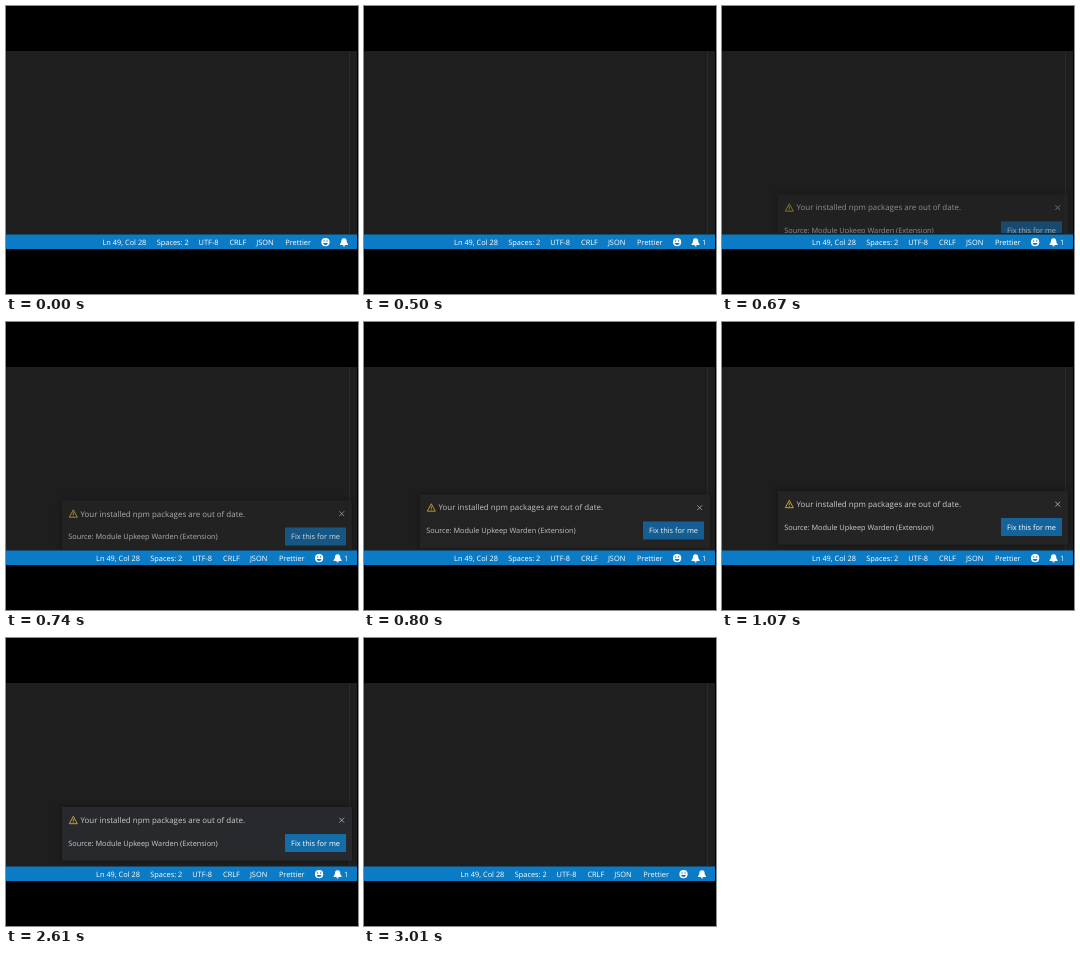
An HTML page for the animation above (8000 ms loop, 352 by 288 pixels).

```html
<!DOCTYPE html>
<html lang="en">
<head>
<meta charset="utf-8">
<title>Editor notification</title>
<style>
  html, body { margin: 0; width: 100%; height: 100%; overflow: hidden; background: #000; }
  svg { display: block; width: 352px; height: 288px; }
  text {
    font: 7.4px "Open Sans", "Noto Sans", sans-serif;
    text-rendering: geometricPrecision;
    white-space: pre;
  }
  #status { fill: #fff; }
  #toast { fill: #ccc; }
  #panel { filter: drop-shadow(0 0 3px rgba(0, 0, 0, .4)); }
  .title { font-size: 7.95px; }
</style>
</head>
<body>
<svg viewBox="0 0 352 288">
  <clipPath id="editorArea"><rect y="45" width="351" height="182"/></clipPath>

  <rect y="45" width="351" height="184" fill="#1e1e1e"/>
  <path d="M343.5 45V228" stroke="#2a2a2a"/>

  <g clip-path="url(#editorArea)">
    <g id="toast">
      <rect id="panel" x="56" y="169" width="290" height="53.5"/>
      <g fill="none" stroke="#d2ae2c" stroke-width=".9" stroke-linejoin="round">
        <path d="M67.3 178.3L71.3 185.7H63.3Z"/>
        <path d="M67.3 180.8V183.4M67.3 184.1V184.9"/>
      </g>
      <text class="title" x="74.5" y="185">Your installed npm packages are out of date.</text>
      <path d="M333.3 179.8l4.8 4.8m0-4.8l-4.8 4.8" stroke="#bbb" stroke-width=".8"/>
      <text x="62.2" y="207.7" style="font-size:7.33px">Source: Module Upkeep Warden (Extension)</text>
      <rect id="button" x="279" y="196" width="61" height="18"/>
      <text x="309.5" y="207.7" text-anchor="middle" fill="#fff">Fix this for me</text>
    </g>
  </g>

  <rect y="228.5" width="351" height="14.5" fill="#0a7bc4"/>
  <g id="status">
    <text x="96.5" y="238.8">Ln 49, Col 28</text>
    <text x="150.7" y="238.8">Spaces: 2</text>
    <text x="192.6" y="238.8">UTF-8</text>
    <text x="223.4" y="238.8">CRLF</text>
    <text x="250.3" y="238.8">JSON</text>
    <text x="279.3" y="238.8">Prettier</text>
    <circle cx="319.5" cy="236.2" r="4.1"/>
    <g fill="#0a7bc4">
      <circle cx="318" cy="235" r=".7"/>
      <circle cx="321" cy="235" r=".7"/>
      <path d="M317 237.1h5q-.6 2-2.5 2t-2.5-2Z"/>
    </g>
    <path d="M338 232.2c2.2 0 2.6 1.6 2.7 3.2q.1 1.6 1.3 2.7v.8h-8v-.8q1.2-1.1 1.3-2.7c.1-1.6.5-3.2 2.7-3.2ZM336.8 239.3h2.4q-.2 1.2-1.2 1.2t-1.2-1.2Z"/>
    <text id="badge" x="344.4" y="238.8">1</text>
  </g>
</svg>

<script>
const LOOP = 8000;
const SLIDE_START = 503, SLIDE_TIME = 372, SLIDE_HEIGHT = 54;
const byId = id => document.getElementById(id);
const [toast, panel, button, status, badge] =
  ["toast", "panel", "button", "status", "badge"].map(byId);

const show = (node, on) => node.setAttribute("visibility", on ? "visible" : "hidden");
const easeOut = x => 1 - (1 - Math.min(1, Math.max(0, x))) ** 1.7;

function render(t) {
  const notified = t >= 500 && t < 2975;
  status.setAttribute("transform", `translate(${notified ? -6.4 : 0} 0)`);
  show(badge, notified);

  const shown = easeOut((t - SLIDE_START) / SLIDE_TIME);
  show(toast, t >= 570 && t < 2940);
  toast.setAttribute("transform", `translate(0 ${SLIDE_HEIGHT * (1 - shown)})`);
  toast.setAttribute("opacity", shown);

  // Pointer enters the toast, then its button.
  panel.setAttribute("fill", t < 2370 ? "#242425" : "#28292c");
  button.setAttribute("fill", t < 2610 ? "#14639b" : "#146da9");
}

function tick() {
  render(performance.now() % LOOP);
  requestAnimationFrame(tick);
}
tick();
</script>
</body>
</html>
```
